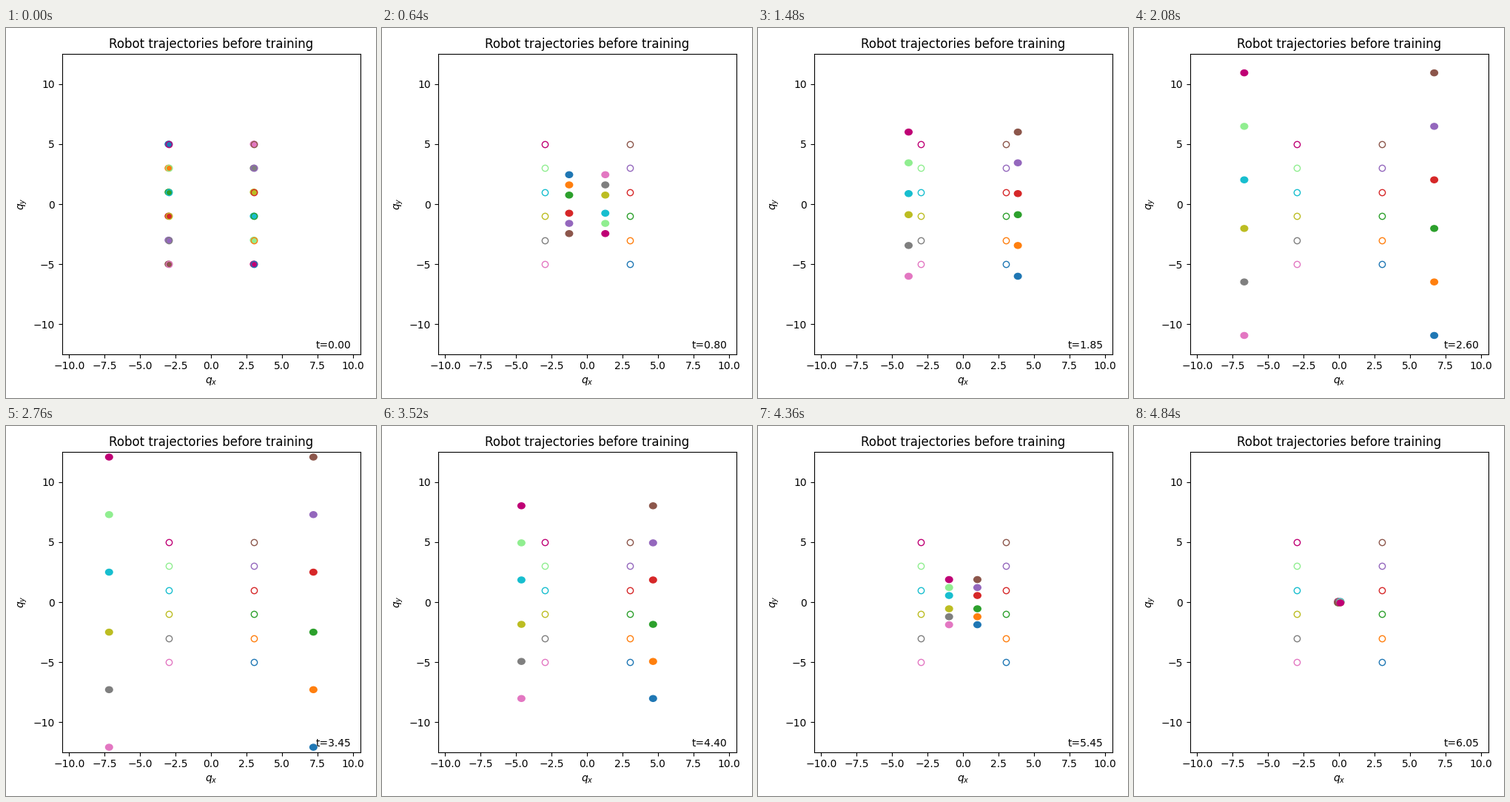
Animation, 500 px wide and 500 px high, one loop 4.88 s. Source, as a matplotlib script:

```python
import numpy as np
import matplotlib.pyplot as plt
from matplotlib.animation import FuncAnimation
from matplotlib.patches import Circle

FRAMES, INTERVAL, DT = 122, 40, 0.05
DAMPING, OMEGA = 0.1, np.sqrt(0.99)
KICK = 0.5  # initial vertical speed, away from the centre line

COLORS = ["tab:blue", "tab:orange", "tab:green", "tab:red", "tab:purple",
          "tab:brown", "tab:pink", "tab:gray", "tab:olive", "tab:cyan",
          "lightgreen", "#bf0075"]
START = np.array([(x, y) for x in (-3, 3) for y in range(5, -6, -2)], float)
TARGET = -START
VELOCITY = np.column_stack([np.zeros(len(START)), KICK * np.sign(START[:, 1])])


def positions(t):
    """Damped spring pulling every robot to its target."""
    decay = np.exp(-DAMPING * t)
    sine = np.sin(OMEGA * t) / OMEGA
    swing = decay * (np.cos(OMEGA * t) + DAMPING * sine)
    return TARGET + (START - TARGET) * swing + VELOCITY * decay * sine


fig, ax = plt.subplots(figsize=(5, 5), dpi=100)
ax.set_xlim(-10.5, 10.5)
ax.set_ylim(-12.5, 12.5)
ax.set_xlabel("$q_x$")
ax.set_ylabel("$q_y$")
ax.set_title("Robot trajectories before training")

robots = []
for color, start, target in zip(COLORS, START, TARGET):
    ax.plot(*target, "o", color=color, fillstyle="none", markersize=6)
    robots.append(ax.add_patch(Circle(start, 0.25, color=color, lw=1)))
clock = ax.text(0.97, 0.02, "t=0.00", transform=ax.transAxes, ha="right")
fig.tight_layout()
fig.subplots_adjust(top=0.9293)


def update(frame):
    t = frame * DT
    for robot, pos in zip(robots, positions(t)):
        robot.center = pos
    clock.set_text(f"t={t:.2f}")
    return robots + [clock]


anim = FuncAnimation(fig, update, frames=FRAMES, interval=INTERVAL,
                     repeat=True, repeat_delay=0)
plt.show()
```
